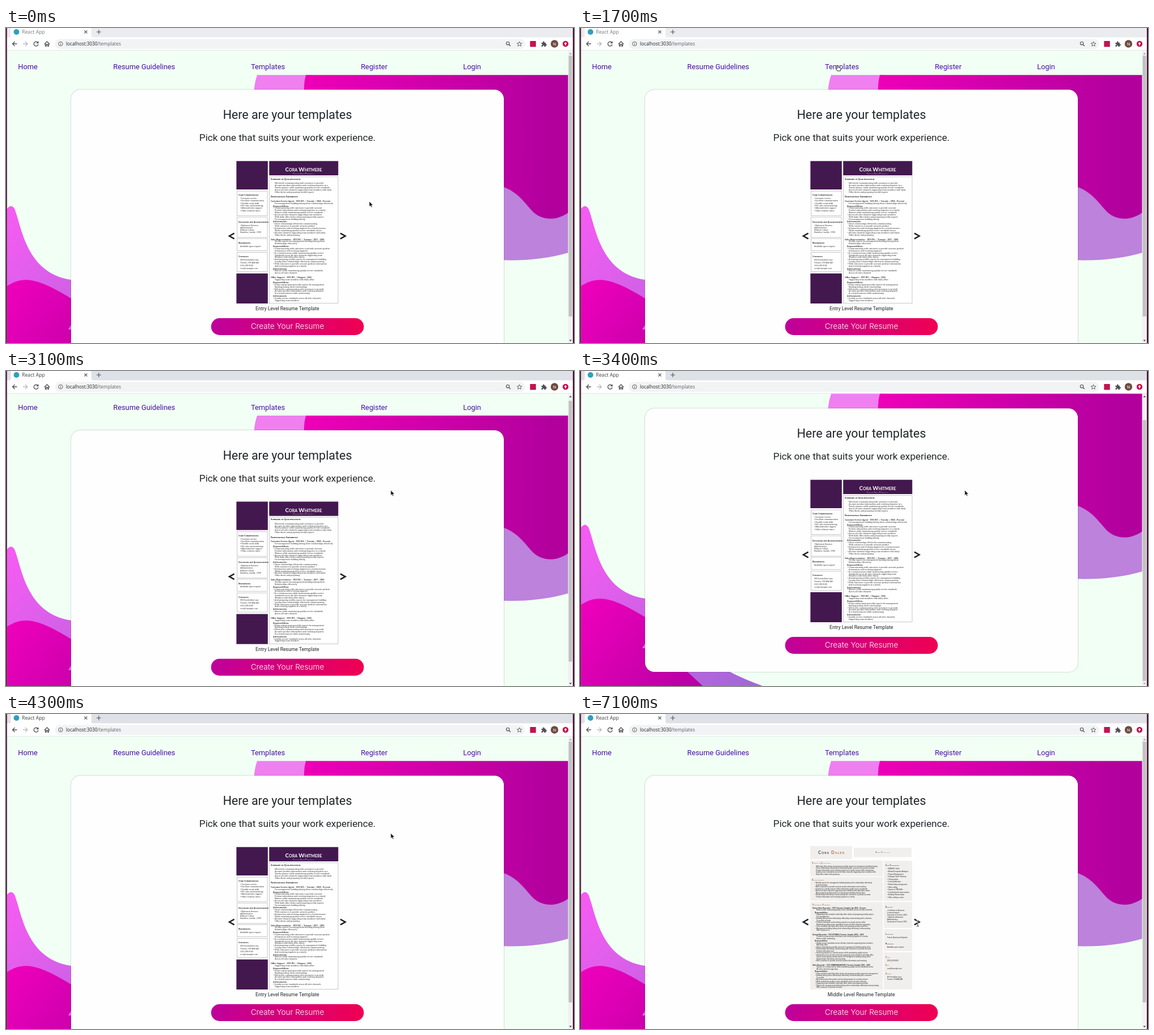
Animation of 1004x558 px, one loop 8000 ms. Source, as an HTML page:

```html
<!DOCTYPE html>
<html lang="en">
<head>
<meta charset="utf-8">
<title>Resume templates</title>
<style>
html, body { margin: 0; width: 100%; height: 100%; overflow: hidden; background: #fff; }
svg { display: block; width: 1004px; height: 558px; font-family: Roboto, sans-serif; }
.ui { font-family: "Open Sans", sans-serif; }
.serif { font-family: "Noto Serif", serif; }
.sans { font-family: "Liberation Sans", sans-serif; }
.lato { font-family: Lato, sans-serif; }
.caps { font-variant: small-caps; }
.mid { text-anchor: middle; }
.line { fill: none; stroke: #4d5156; stroke-width: 1.3; }
</style>
</head>
<body>
<svg id="stage" viewBox="0 0 1004 558"></svg>
<script>
const LOOP = 8000, MAX_SCROLL = 43;

const text = (x, y, size, str, attrs = '') =>
  `<text x="${x}" y="${y}" font-size="${size}" ${attrs}>${str}</text>`;
const rect = (x, y, w, h, fill, attrs = '') =>
  `<rect x="${x}" y="${y}" width="${w}" height="${h}" fill="${fill}" ${attrs}/>`;
const circle = (x, y, r, fill) => `<circle cx="${x}" cy="${y}" r="${r}" fill="${fill}"/>`;
const path = (d, attrs) => `<path d="${d}" ${attrs}/>`;
const gradient = (id, from, to, x1, y1, x2, y2) =>
  `<linearGradient id="${id}" gradientUnits="userSpaceOnUse" x1="${x1}" y1="${y1}" x2="${x2}" y2="${y2}">
  <stop stop-color="${from}"/><stop offset="1" stop-color="${to}"/></linearGradient>`;

// Small print: running words cut to a wanted length.
const words = ('effectively communicating with customers to provide accurate product information and ' +
  'resolving inquiries in a timely manner while maintaining quality service standards across ' +
  'all sales channels supporting team members with daily office duties and preparing weekly ' +
  'reports for management building lasting client relationships').split(' ');
let wordAt = 0;
function filler(length) {
  let s = '';
  while (s.length < length - 4) s += (s && ' ') + words[wordAt++ % words.length];
  return s[0].toUpperCase() + s.slice(1);
}

// Rows: '#' heading, '@' job, '!' subheading, other strings as they are,
// numbers are filler lines (positive with a bullet, negative without).
function block(x, y, style, rows) {
  const { size, step, after, head, job, color } = style;
  let out = '', last = '';
  rows.forEach((row, i) => {
    const kind = typeof row === 'number' ? '' : '#@!'.includes(row[0]) ? row[0] : '';
    if (i) y += last === '#' ? after : { '#': head, '@': job, '!': step + 1 }[kind] || step;
    const str = kind ? row.slice(1) : typeof row === 'string' ? row
      : (row > 0 ? '• ' : '') + filler(Math.abs(row));
    const indent = { '#': 0, '@': 0, '!': 4 }[kind] ?? (row > 0 ? 5 : row < 0 ? 7 : 3);
    const look = { '#': `class="caps" font-weight="700" fill="${color}"`, '@': 'font-weight="700"',
      '!': 'font-weight="700" font-style="italic"' }[kind] || '';
    out += text(x + indent, +(y + 1.2).toFixed(2), kind === '#' ? size * 1.08 : size, str, look);
    last = kind;
  });
  return out;
}

const frame = (x, y, w, h) => rect(x, y, w, h, '#fff', 'stroke="#b9b9b9" stroke-width=".8"');

function entryResume() {
  const purple = '#43184f';
  const main = { size: 3.4, step: 3.85, after: 7.4, head: 8.9, job: 8, color: '#111' };
  const side = { ...main, size: 3.3, step: 4.3, after: 5.8 };
  return rect(407.3, 235.7, 55.5, 50.3, purple) + rect(407.3, 434.8, 55.5, 53.2, purple) +
    rect(465.2, 235.7, 122.1, 25.3, purple) +
    text(526, 254, 9.8, 'Cora Whitmere', 'class="lato caps mid" font-weight="700" fill="#fff"') +
    text(526, 258.6, 3.4, 'Customer Service Professional', 'class="lato caps mid" fill="#e5d9ea"') +
    frame(465.4, 263.4, 121.6, 224.2) +
    [[289, 43.5], [335, 36], [373, 21.5], [397.4, 34]].map(([y, h]) => frame(408.4, y, 53.6, h)).join('') +
    '<g class="serif" fill="#2a2a2a">' +
    block(468, 267.5, main, ['#Summary of Qualifications', -54, -60, -58, -60, -42,
      '#Professional Experience', '@Customer Service Agent ~ XYZ INC. | Toronto | 2020 – Present', -60,
      '!Responsibilities:', 50, -54, -48, 52, -50, -30, '!Achievements:', 50, -46, 56, -54, 54, -28,
      '@Sales Representative ~ XYZ INC. | Toronto | 2017 – 2020', -56, -20,
      '!Responsibilities:', 56, -38, 54, -52, -36, 56, -54, 52, -34, '!Achievements:', 52, -28,
      '@Office Support ~ XYZ INC. | Niagara | 2016', -44,
      '!Responsibilities:', 52, -34, 54, -52, -36, '!Achievements:', 50, -22]) +
    block(411, 296, side, ['#Core Competencies', '• Customer service', '• Excellent communication',
      '• Flexible social skills', '• B2C sales and marketing', '• Administrative support', '• Office software suites']) +
    block(411, 343.5, { ...side, size: 3.1 }, ['#Education and Qualifications', '• Diploma in Business',
      'Administration', 'Hillmont College', 'Hamilton, Canada | 1998']) +
    block(411, 380.8, side, ['#References', 'Available upon request']) +
    block(411, 404.8, { ...side, step: 4.9 }, ['#Contacts', '000 Fernhollow Lane', 'Toronto, ON A0A 0A0',
      '(555) 010-0100', 'cora@example.com']) + '</g>';
}

function middleResume() {
  const gray = '#f0efee';
  const main = { size: 2.9, step: 3.5, after: 5.9, head: 10, job: 7.5, color: '#a8623a' };
  const side = { ...main, step: 4.6, after: 6.2, color: '#333' };
  const boxes = [[407, 234, 74, 23], [484, 237, 102, 16.5], [407, 259.5, 128.5, 28], [407, 289, 128.5, 42],
    [407, 333, 128.5, 155], [537, 260, 50, 71], [537, 333, 50, 46], [537, 381, 50, 39], [537, 422, 50, 66]];
  return boxes.map(b => rect(...b, gray)).join('') +
    text(444.5, 248, 7.6, 'Cora <tspan fill="#b3683a">Dalen</tspan>',
      'class="lato caps mid" font-weight="700" letter-spacing="1.1" fill="#444"') +
    text(535, 246.4, 3.4, 'Sales <tspan fill="#b3683a">Executive</tspan>',
      'class="lato caps mid" font-weight="700" letter-spacing=".4" fill="#444"') +
    '<g class="sans" fill="#222">' +
    block(410, 263.5, main, ['#Summary of Qualifications', -82, -84, -78, -82, -28]) +
    block(410, 293.3, main, ['#Accomplishments', 80, -14, 70, 72, 78, -70, 76, -56]) +
    block(411, 337.5, main, ['#Professional Experience',
      '@Senior Sales Executive ~ XYZ | Toronto, Canada | Jan 2020 – Present', -80,
      '!Responsibilities:', 78, -14, 76, -22, 72, -74, 74, 78, -20,
      '@General Associate ~ XYZ STORES | Toronto, Canada | 2013 – 2019', -76, -24,
      '!Responsibilities:', 74, -18, 72, 78, -26, 70, 76, -74, -30, 66,
      '@Sales Associate ~ XYZ COMMUNICATIONS | Toronto, Canada | 2011 – 2013', -80, -24,
      '!Responsibilities:', 78, 74, -14, 72, 66, 70, 78, -34]) +
    block(540, 268, side, ['#Core Competencies', '• B2B/B2C Sales', '• Market/Competitor Analysis',
      '• Project Management', '• Strategic Sales Planning', '• Closing deals', '• Lead qualification',
      '• Relationship management', '• Sales calling', '• Superior CRM Skills',
      '• Coordination/Communication', '• Building Relationships', '• Office software suites']) +
    block(540, 341.5, { ...side, step: 4 }, ['#Education', '• Certificate in Business', 'Communications',
      'University of Toronto | 2014', '• Diploma of Business', 'Administration', 'University of Toronto | 2011']) +
    block(540, 390, { ...side, head: 10.4 }, ['#Languages', 'French (fluent) and Spanish',
      '#References', 'Available upon request']) +
    block(540, 430.5, { ...main, head: 8.8 }, ['#Phone', '(555) 010-0100', '#Email', 'cora@example.com',
      '#Address', '00 Fernhollow Lane', 'Toronto, ON A0A 0A0']) + '</g>';
}

function page() {
  const nav = [['Home', 21.3], ['Resume Guidelines', 189.5], ['Templates', 433], ['Register', 627.2], ['Login', 808]];
  const dark = 'class="mid" fill="#212529"';
  const chevron = 'fill="none" stroke="#1d2024" stroke-width="2.5"';
  return rect(2, 40, 992, 600, '#f1fff4') +
    path('M444 83.300Q439 97 438.500 112H540V83.300Z', 'fill="#f07ff0"') +
    path('M870 260V411Q940 414 994 398V300Z', 'fill="#bc82dc"') +
    path('M530 83.300Q526 97 527 112L880 282C905 291 917 310 930 324S968 345 994 327V83.300Z', 'fill="url(#magenta)"') +
    path('M2 320Q9 311 15 320C28 352 35 434 115 446C200 465 225 545 265 576Q290 589 323 601H2Z', 'fill="url(#violet)"') +
    path('M2 457C30 439 55 442 115 479C160 510 150 545 190 576Q202 587 217 601H2Z', 'fill="url(#berry)"') +
    path('M110 534L115 526V534Z', 'fill="#e26be6"') +
    nav.map(([s, x]) => text(x, 73, 12.85, s, 'fill="#4a0ca8"')).join('') +
    rect(115, 109.3, 765, 466.7, 'none', 'rx="16.500" stroke="#000" stroke-opacity=".13" stroke-width="2"') +
    rect(115, 109.3, 765, 466.7, '#fefefe', 'rx="16.500"') +
    text(497.5, 161, 21.45, 'Here are your templates', dark) +
    text(497.5, 200.3, 17.2, 'Pick one that suits your work experience.', dark) +
    path('M403.500 363.600L394.800 368.500L403.500 373.400', chevron) +
    path('M591 363.600L599.700 368.500L591 373.400', chevron) +
    `<g id="entry">${entryResume()}${text(497.3, 500, 8.6, 'Entry Level Resume Template', dark)}</g>` +
    `<g id="middle">${middleResume()}${text(497.3, 500, 8.6, 'Middle Level Resume Template', dark)}</g>` +
    rect(362.5, 514, 270, 30, 'url(#button)', 'rx="15"') +
    text(497.5, 533.4, 13.6, 'Create Your Resume', 'class="mid" fill="#fff" font-weight="300" style="font-family:Inter,sans-serif"');
}

function browser() {
  const red = '#c2134f';
  return rect(0, 0, 1004, 17, '#dee1e6', 'id="strip"') +
    path('M5 17Q8.500 17 8.500 13V0H151V13Q151 17 155 17Z', 'fill="#fff"') +
    rect(0, 16.5, 1004, 23.5, '#fff') + rect(0, 39.3, 1004, .8, '#dcdfe2') +
    circle(18.5, 7, 5, '#2f9fc0') +
    text(28, 10.3, 8.75, 'React App', 'class="ui" id="tab"') +
    path('M138.500 4.500l5 5m0-5l-5 5M160 7h8m-4-4v8', 'class="line" style="stroke-width:1.1"') +
    path('M19.500 28H11.500m4-4l-4 4l4 4', 'class="line"') +
    path('M30 28H38m-4-4l4 4l-4 4', 'class="line" style="stroke:#b9bcc0"') +
    path('M56.300 25.800A3.900 3.900 0 1 0 57 29M57 23.800V26.700H54', 'class="line"') +
    path('M68 28.500L72.500 24L77 28.500M69.500 27.500V32H71.300V29H73.700V32H75.500V27.500', 'class="line"') +
    rect(86.5, 19.5, 831, 17.5, '#f1f3f4', 'rx="8.750"') +
    '<circle cx="96.500" cy="28" r="3.700" class="line" style="stroke-width:.9"/>' +
    path('M96.500 27.500V30.200M96.500 25.700V26.600', 'class="line" style="stroke-width:.9"') +
    text(106, 31, 8.25, 'localhost:3030<tspan fill="#5f6368">/templates</tspan>', 'class="ui" fill="#202124"') +
    '<circle cx="887" cy="27.200" r="2.700" class="line" style="stroke-width:1.1"/>' +
    path('M889 29.200L891.800 32', 'class="line"') +
    path('M907.500 24l1.200 2.900 3.100.2-2.400 2 .8 3-2.700-1.700-2.700 1.700.8-3-2.400-2 3.100-.2Z', 'class="line" style="stroke-width:.9"') +
    rect(926.3, 23, 10.4, 10.4, red) +
    path('M946.500 26H949Q948.500 23.500 950.300 23.500T951.700 26H954V28.500Q956 28.300 956 29.800T954 31V33H951.500Q951.500 31 950 31T948.700 33H946.500V30.500Q948.300 30.300 948.300 29.300T946.500 28.200Z', 'fill="#4d5156"') +
    circle(969.5, 28, 6.7, '#6d4c41') +
    text(969.5, 30.6, 7.3, 'N', 'class="mid" fill="#fff"') +
    circle(989, 28, 5.2, red) + path('M989 25l2.700 2.900h-1.700v2.600h-2v-2.600h-1.700Z', 'fill="#fff"') +
    rect(993.5, 40, 8.5, 518, '#f1f1f1') + rect(994.6, 49, 6.2, 462, '#c1c1c1', 'id="thumb"') +
    path('M995.300 46.500L997.800 43.800L1000.300 46.500Z', 'id="up"') +
    path('M995.300 552.500L997.800 555.200L1000.300 552.500Z', 'id="down"') +
    '<g id="status">' + path('M2 558V543.500H114Q117 543.500 117 546.500V558Z', 'fill="#f1f3f4" stroke="#cfd2d6" stroke-width=".6"') +
    text(6, 554, 8.25, 'localhost:3030/templates', 'class="ui" fill="#5f6368"') + '</g>' +
    rect(0, 0, 1.7, 558, '#4b0a34') + rect(1002, 0, 2, 558, '#4b0a34');
}

const beam = 'M-2.200-5Q-.5-5 0-4.200Q.5-5 2.200-5M0-4.200V4.200M-2.200 5Q-.5 5 0 4.200Q.5 5 2.200 5';
const cursors = {
  arrow: path('M0 0V9.500L2.200 7.600 3.700 11 5.300 10.300 3.900 7.100H6.800Z', 'fill="#161616" stroke="#fff" stroke-width=".7"'),
  hand: path('M-1 .6A1 1 0 0 1 1 .6V3.300L4.200 4.100Q5.400 4.600 5.200 6L4.500 9.500H-.8L-3.300 5.600Q-3.500 4.300-2.200 4.600L-1 5.600Z', 'fill="#fff" stroke="#161616" stroke-width=".9"'),
  beam: path(beam, 'fill="none" stroke="#fff" stroke-width="1.800"') + path(beam, 'fill="none" stroke="#161616" stroke-width=".9"')
};

const $ = id => document.getElementById(id);
$('stage').innerHTML = '<defs>' +
  gradient('magenta', '#ee00b8', '#b2009d', 527, 100, 960, 100) +
  gradient('violet', '#f45cf2', '#a467d8', 2, 340, 290, 600) +
  gradient('berry', '#ee00bb', '#b600a3', 10, 450, 210, 600) +
  gradient('button', '#bf009b', '#ef0052', 363, 0, 632, 0) +
  '<clipPath id="view"><rect x="1.700" y="40" width="992.300" height="518"/></clipPath></defs>' +
  `<g clip-path="url(#view)"><g id="page">${page()}</g></g>${browser()}` +
  '<g id="cursor">' + Object.entries(cursors).map(([k, s]) => `<g id="${k}">${s}</g>`).join('') + '</g>';

const pointer = [
  [0, 642, 307, 'arrow'], [800, 546, 150, 'arrow'], [900, 462.5, 39, 'arrow'],
  [1100, 492, 62, 'hand'], [1200, 529, 97, 'arrow'], [1300, 502, 84, 'arrow'], [1400, 474, 70, 'hand'],
  [1500, 438, 66, 'hand'], [1600, 447, 67, 'hand'], [1700, 455.7, 66.5, 'hand'],
  [2500, 500, 92, 'arrow'], [2600, 561, 133, 'arrow'], [2700, 622, 173, 'arrow'], [2800, 664, 201, 'arrow'],
  [2900, 680, 211, 'arrow'], [4800, 679, 212, 'arrow'], [4900, 679.5, 211, 'arrow'],
  [5600, 652, 262, 'arrow'], [5700, 612, 333, 'arrow'], [5800, 596, 361.5, 'beam'],
  [6100, 595.5, 366, 'beam'], [6200, 596, 368, 'beam'], [6300, 596, 370, 'beam'], [6400, 596.3, 371.5, 'beam'],
  [6900, 597, 371, 'beam']
];
const scrolls = [[0, 0], [3100, 4.3], [3200, MAX_SCROLL], [3900, 4], [4300, 0]];
const at = (keys, t) => keys.findLast(k => k[0] <= t);
const show = (id, on) => $(id).setAttribute('display', on ? 'inline' : 'none');

function draw() {
  const t = performance.now() % LOOP;
  const [, x, y, kind] = at(pointer, t);
  const scroll = at(scrolls, t)[1], focused = t >= 1900;
  $('page').setAttribute('transform', `translate(0 ${-scroll})`);
  $('thumb').setAttribute('y', 49 + scroll * 38 / MAX_SCROLL);
  $('up').setAttribute('fill', scroll ? '#505050' : '#a3a3a3');
  $('down').setAttribute('fill', t >= 3400 && t < 3900 ? '#a3a3a3' : '#505050');
  $('strip').setAttribute('fill', focused ? '#dee1e6' : '#eaecef');
  $('tab').setAttribute('fill', focused ? '#3c4043' : '#777a7e');
  show('status', focused && t < 2500);
  show('entry', t < 7100);
  show('middle', t >= 7100);
  $('cursor').setAttribute('transform', `translate(${x} ${y})`);
  for (const k in cursors) show(k, k === kind);
  requestAnimationFrame(draw);
}
draw();
</script>
</body>
</html>
```
